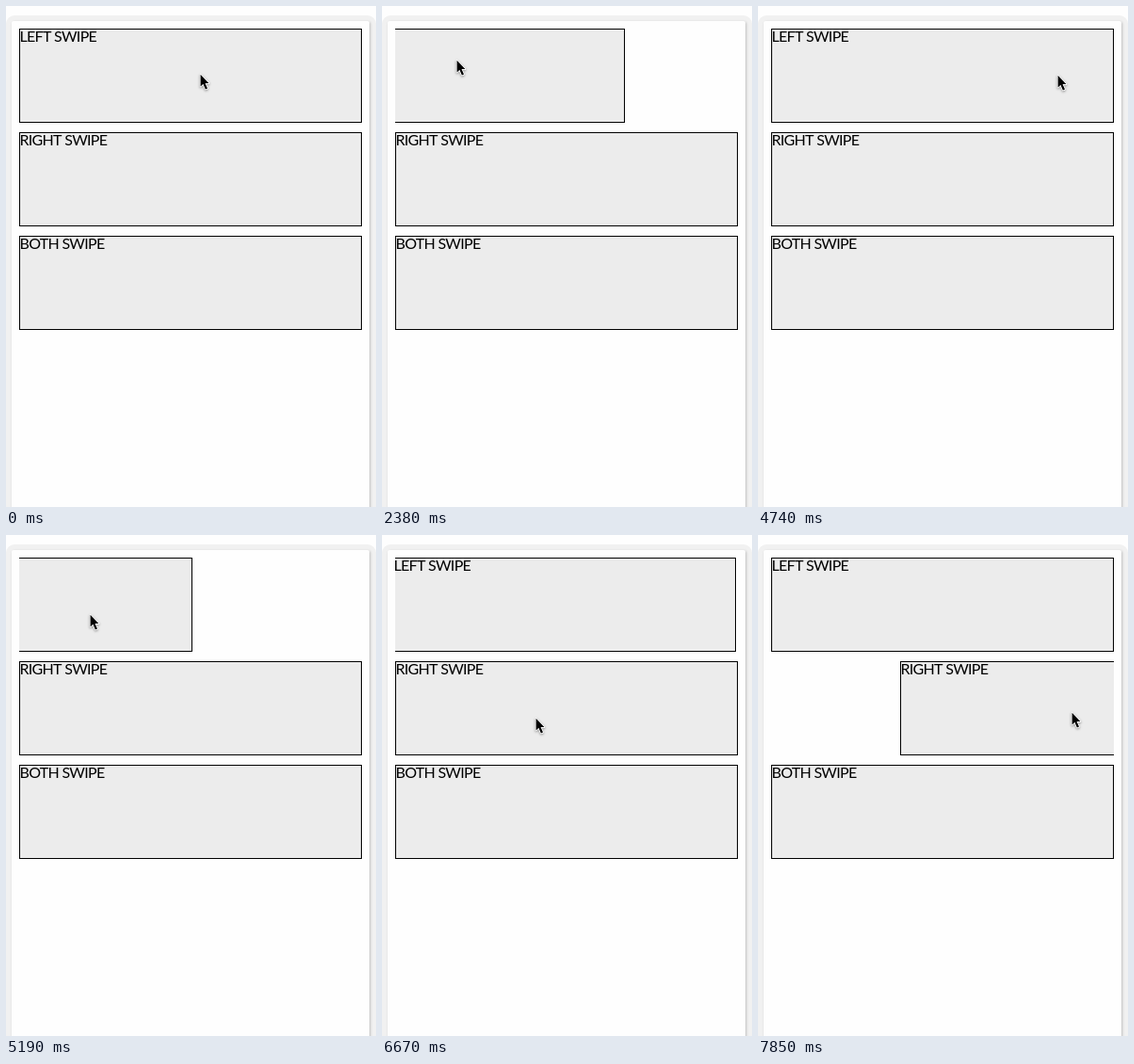
Write an HTML page with a canvas that moves like this. It is 393x532 px and loops after 8000 ms.

```html
<!DOCTYPE html>
<html lang="en">
<head>
<meta charset="utf-8">
<title>Swipe demo</title>
<style>
  html, body { margin: 0; width: 100%; height: 100%; overflow: hidden; background: #fefefe; }
  canvas { display: block; }
</style>
</head>
<body>
<canvas id="stage" width="393" height="532"></canvas>
<script>
const ctx = document.getElementById('stage').getContext('2d');
const LOOP = 8000;
const TICKS = 54;
const SPRING = 0.27; // share of the offset left one tick after release

// Pointer strokes; the pointer rests between them.
const home = { x: 206, y: 72 };
const strokes = [
  // look around, then drag the first card left and partly back
  { from: 0, to: 2, x: 229, y: 76 },
  { from: 2, to: 4, x: 210, y: 74 },
  { from: 7, to: 16, x: 79, y: 57 },
  { from: 17, to: 19, x: 99, y: 61 },
  // a short second drag
  { from: 21, to: 25, x: 254, y: 84 },
  { from: 25, to: 27, x: 168, y: 76 },
  { from: 27, to: 32, x: 318, y: 73 },
  // a long third drag
  { from: 32, to: 36, x: 12, y: 88 },
  { from: 36, to: 37, x: 108, y: 92 },
  { from: 38, to: 39, x: 162, y: 96 },
  { from: 39, to: 41, x: 169, y: 98 },
  // down to the second card and drag it right
  { from: 42, to: 45, x: 163, y: 194 },
  { from: 45, to: 48, x: 196, y: 191 },
  { from: 49, to: 53, x: 333, y: 188 }
];

const leftDrags = [
  { grab: 199, start: 7, release: 21 },
  { grab: 254, start: 25, release: 27 },
  { grab: 269, start: 32, release: 42 }
];
const rightDrags = [{ grab: 196, start: 49, release: TICKS }];

function pointerAt(tick) {
  let { x, y } = home;
  for (const s of strokes) {
    if (tick <= s.from) break;
    const p = Math.min(1, (tick - s.from) / (s.to - s.from));
    x += (s.x - x) * p;
    y += (s.y - y) * p;
  }
  return { x: Math.round(x), y: Math.round(y) };
}

// The card follows the pointer one way only and springs home when released.
function cardOffset(drags, tick, direction) {
  const drag = drags.findLast(d => d.start <= tick);
  if (!drag) return 0;
  const held = pointerAt(Math.min(tick, drag.release)).x - drag.grab;
  const pull = Math.max(0, held * direction);
  const decay = SPRING ** Math.max(0, tick - drag.release);
  return direction * Math.round(pull * decay);
}

function roundRect(x, y, w, h, r, fill) {
  ctx.beginPath();
  ctx.roundRect(x, y, w, h, r);
  ctx.fillStyle = fill;
  ctx.fill();
}

function drawPage() {
  ctx.fillStyle = '#fefefe';
  ctx.fillRect(0, 0, 393, 532);
  roundRect(0, 10, 393, 540, 9, '#f1f1f1');
  ctx.save();
  ctx.shadowColor = 'rgba(0,0,0,0.22)';
  ctx.shadowBlur = 3;
  ctx.shadowOffsetX = 1;
  ctx.shadowOffsetY = 1;
  roundRect(6, 16, 380, 540, 2, '#fefefe');
  ctx.restore();
}

function drawCard(label, y, offset) {
  ctx.save();
  ctx.beginPath();
  ctx.rect(14, y, 364, 100);
  ctx.clip();
  ctx.translate(14 + offset, y);
  ctx.fillStyle = '#ececec';
  ctx.fillRect(0, 0, 364, 100);
  ctx.strokeStyle = '#000';
  ctx.lineWidth = 1;
  ctx.strokeRect(0.5, 0.5, 363, 99);
  ctx.fillStyle = '#000';
  ctx.font = '16px Lato, sans-serif';
  ctx.letterSpacing = '-0.7px';
  ctx.fillText(label, 0.5, 14);
  ctx.restore();
}

function drawPointer({ x, y }) {
  const arrow = new Path2D('M0 0V14L3.2 11L6 17.4L8.4 16.4L5.6 10.2H10Z');
  ctx.save();
  ctx.translate(x + 0.6, y + 0.8);
  ctx.scale(0.88, 0.9);
  ctx.lineJoin = 'round';
  ctx.lineWidth = 2;
  ctx.strokeStyle = '#fff';
  ctx.shadowColor = 'rgba(0,0,0,0.4)';
  ctx.shadowBlur = 2.5;
  ctx.shadowOffsetY = 1;
  ctx.stroke(arrow);
  ctx.shadowColor = 'transparent';
  ctx.fillStyle = '#000';
  ctx.fill(arrow);
  ctx.restore();
}

function draw(time) {
  // a few ms of lead keep the steps on their rounded start times
  const tick = Math.min(TICKS - 1, Math.floor((time % LOOP + 5) * TICKS / LOOP));
  drawPage();
  drawCard('LEFT SWIPE', 24, cardOffset(leftDrags, tick, -1));
  drawCard('RIGHT SWIPE', 134, cardOffset(rightDrags, tick, 1));
  drawCard('BOTH SWIPE', 244, 0);
  drawPointer(pointerAt(tick));
}

function loop() {
  draw(performance.now());
  requestAnimationFrame(loop);
}
loop();
</script>
</body>
</html>
```
